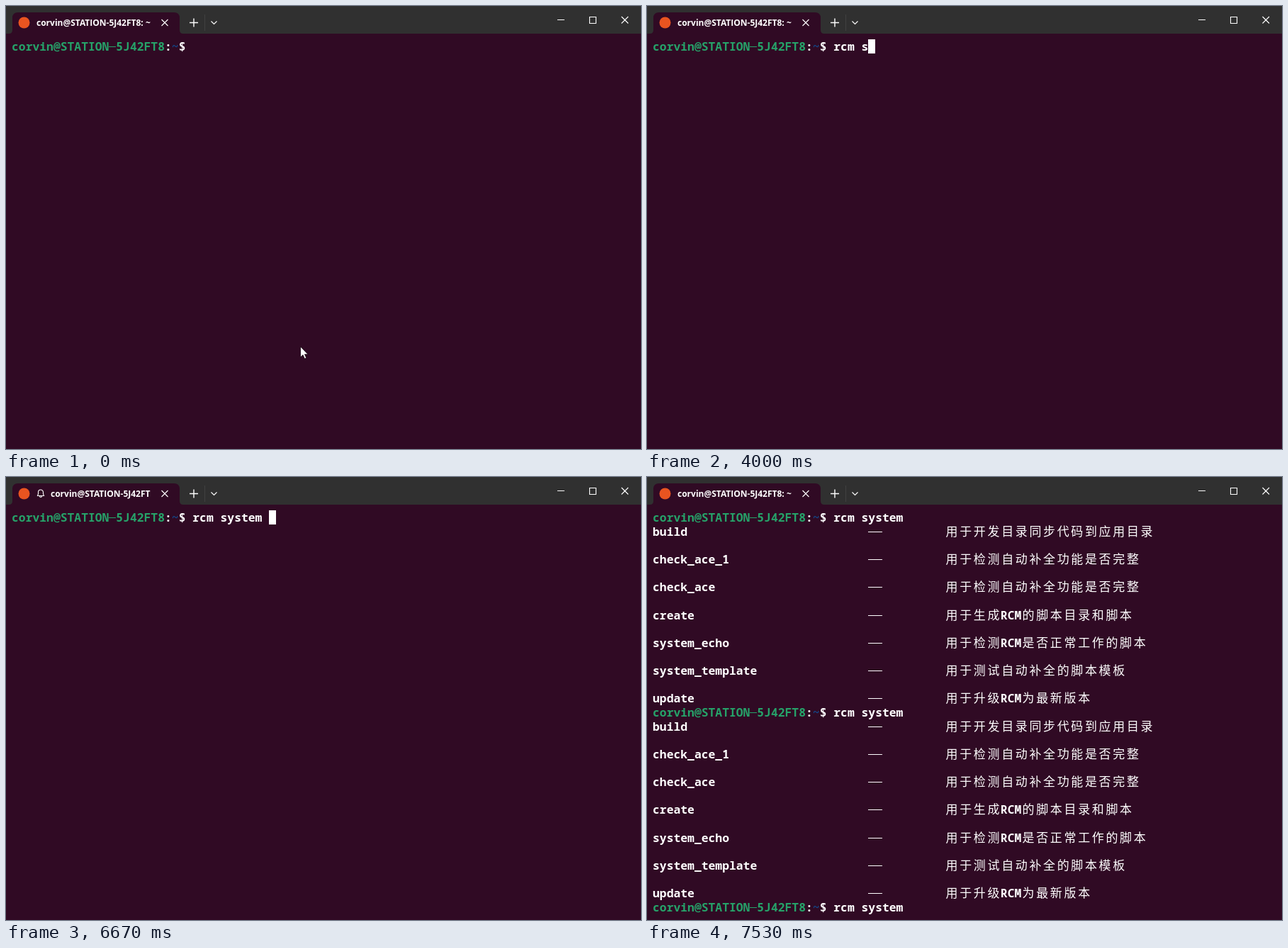
An HTML page for the animation above (8000 ms loop, 896 by 625 pixels).

```html
<!DOCTYPE html>
<html lang="zh-CN">
<head>
<meta charset="utf-8">
<title>Terminal</title>
<style>
  html, body { margin: 0; width: 100%; height: 100%; overflow: hidden; background: #300a24; }
  #stage { position: relative; width: 896px; height: 625px; overflow: hidden; background: #300a24; }
  svg { position: absolute; left: 0; top: 0; }
  .line { fill: none; stroke: #fff; stroke-width: 1.1; }

  #title {
    position: absolute; left: 43px; top: 14px; width: 161px; height: 20px;
    overflow: hidden; white-space: pre; color: #fff;
    font: 700 12px/20px "Open Sans", "Noto Sans", sans-serif;
  }
  .ring #title { left: 63px; width: 141px; }
  #bell { visibility: hidden; }
  .ring #bell { visibility: visible; }

  #screen {
    --row: 19.64px;
    position: absolute; left: 8px; top: 47.3px; color: #fff;
    font: 600 16.37px/var(--row) "Noto Sans Mono", "DejaVu Sans Mono", monospace;
    font-variant-ligatures: none;
  }
  #rows { position: relative; top: 1px; }
  .row { height: var(--row); white-space: pre; }
  .host { color: #26a269; }
  .path { color: #12488b; }
  .han {
    position: relative; left: 1.3px; letter-spacing: 2.64px;
    font: 400 17px/0 "Noto Sans CJK SC", "Noto Sans CJK", sans-serif;
  }
  /* Wide hyphens that nearly fill their cell */
  .dash {
    display: inline-block; height: var(--row); vertical-align: top;
    -webkit-text-fill-color: transparent;
    background: linear-gradient(90deg, transparent .4px, currentColor .4px calc(1ch - .4px), transparent 0)
      0 9px / 1ch 1.2px repeat-x;
  }
  #caret { position: absolute; width: 1ch; height: var(--row); background: #fff; }
</style>
</head>
<body>
<div id="stage">
  <svg width="896" height="625">
    <rect width="896" height="39" fill="#303030"/>
    <path fill="#300a24" d="M4 39Q9 39 9 34V17Q9 9 17 9H237Q245 9 245 17V34Q245 39 250 39Z"/>
    <circle cx="25.5" cy="23.5" r="8" fill="#e95420"/>
    <g class="line">
      <path id="bell" d="M44.5 26.5H53.5L52.5 24V21.5A3.5 3.5 0 0 0 45.5 21.5V24ZM47.5 27A1.5 1.5 0 0 0 50.5 27"/>
      <path d="M219.5 19L228.5 28M228.5 19L219.5 28"/>
      <path d="M259 23.5H271M265 17.5V29.5" stroke-width="1.4"/>
      <path d="M280.5 12V35" stroke="#404040"/>
      <path d="M289.5 21.5L293.5 25.5L297.5 21.5"/>
      <path d="M778 19.5H788M823.5 15.5H832.5V24.5H823.5ZM868.5 15L878 24.5M878 15L868.5 24.5"/>
    </g>
  </svg>
  <div id="title"></div>
  <div id="screen"><div id="rows"></div><div id="caret"></div></div>
  <svg width="896" height="625">
    <path id="mouse" d="M.5 .5V15.6L4 12.3L6.4 17.6L8.8 16.6L6.5 11.4H11Z" fill="#fff" stroke="#15040f" stroke-width=".8"/>
  </svg>
</div>
<script>
const LOOP = 8000, ROW = 19.64, PROMPT_COLS = 26;
const USER = "corvin@STATION-5J42FT8";
const COMMAND = "rcm system ";
const scripts = [
  ["build", "用于开发目录同步代码到应用目录"],
  ["check_ace_1", "用于检测自动补全功能是否完整"],
  ["check_ace", "用于检测自动补全功能是否完整"],
  ["create", "用于生成RCM的脚本目录和脚本"],
  ["system_echo", "用于检测RCM是否正常工作的脚本"],
  ["system_template", "用于测试自动补全的脚本模板"],
  ["update", "用于升级RCM为最新版本"],
];

// Times of each change; typed entries pair a time with a character count
const typed = [[2000, 1], [2270, 2], [2400, 3], [3670, 4], [4000, 5],
  [4270, 6], [4470, 7], [4730, 8], [4800, 9], [5330, 11]];
const blinks = [670, 1200, 1730, 3000, 3530, 6070, 6670, 7530];
const lists = [6800, 6930];
const moves = [[0, 415, 480], [470, 415, 478], [600, 414, 476]];
const MOUSE_GONE = 2070, BELL_ON = 5470, BELL_OFF = 7530;

const $ = id => document.getElementById(id);
const passed = (times, t) => times.filter(x => t >= x).length;
const latest = (keys, t) => keys.filter(k => t >= k[0]).pop();

const row = html => `<div class="row">${html}</div>`;
const dash = s => s.replace(/-+/g, '<span class="dash">$&</span>');
const han = s => s.replace(/[\u4e00-\u9fff]+/g, '<span class="han">$&</span>');
const prompt = text => row(
  `<span class="host">${dash(USER)}</span>:<span class="path">~</span>$ ${text}`);
const listing = scripts.map(([name, note]) =>
  row(name.padEnd(31) + dash("--") + " ".repeat(9) + han(note))).join(row(""));

$("title").textContent = USER + ": ~";

let shown = "";
function draw(t) {
  const count = (latest(typed, t) || [0, 0])[1];
  const blocks = passed(lists, t);
  const state = count + "/" + blocks;
  if (state !== shown) {
    shown = state;
    $("rows").innerHTML = (prompt(COMMAND) + listing).repeat(blocks) + prompt(COMMAND.slice(0, count));
    $("caret").style.left = PROMPT_COLS + count + "ch";
    $("caret").style.top = blocks * scripts.length * 2 * ROW + "px";
  }
  $("caret").style.visibility = passed(blinks, t) % 2 ? "visible" : "hidden";
  $("stage").classList.toggle("ring", t >= BELL_ON && t < BELL_OFF);
  const [, x, y] = latest(moves, t);
  $("mouse").setAttribute("transform", `translate(${x} ${y})`);
  $("mouse").style.visibility = t < MOUSE_GONE ? "visible" : "hidden";
}

const start = performance.now();
function tick() {
  draw((performance.now() - start) % LOOP);
  requestAnimationFrame(tick);
}
tick();
</script>
</body>
</html>
```
